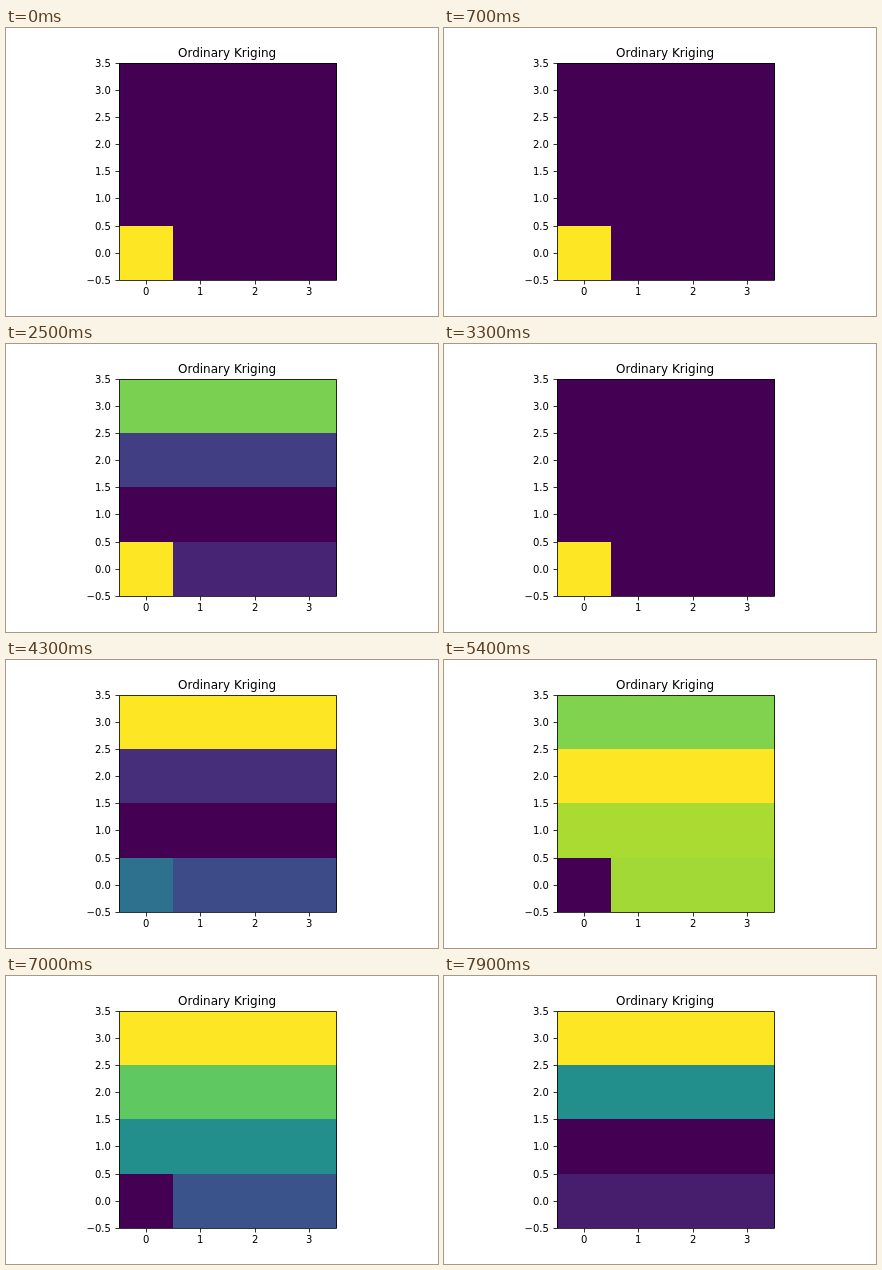
Write an HTML page that moves like this. It is 432x288 px and loops after 8000 ms.

```html
<!DOCTYPE html>
<html lang="en">
<head>
<meta charset="utf-8">
<title>Ordinary Kriging</title>
<style>
  html, body { margin: 0; width: 100%; height: 100%; overflow: hidden; background: #fff; }
  svg { display: block; width: 432px; height: 288px; }
  text { font: 10px "DejaVu Sans", sans-serif; fill: #000; }
  .title { font-size: 12px; }
  .end { text-anchor: end; }
  #cells { shape-rendering: crispEdges; }
  #axes path { fill: none; stroke: #000; stroke-width: .8; }
</style>
</head>
<body>
<svg viewBox="0 0 432 288" xmlns="http://www.w3.org/2000/svg">
  <g id="cells"></g>
  <g id="axes"></g>
</svg>
<script>
const LOOP = 8000, STEP = 100;
const LEFT = 112.68, BOTTOM = 252, CELL = 54.36;

// Viridis, evenly spaced from low to high
const VIRIDIS = '440154 482475 414487 355f8d 2a788e 21918c 22a884 44bf70 7ad151 bddf26 fde725'
  .split(' ').map(hex => [0, 2, 4].map(i => parseInt(hex.slice(i, i + 2), 16)));

// Levels: corner cell, then rows from bottom to top
const HIGH = [1, 0, 0, 0, 0], LOW = [0, 1, 1, 1, 1];
const pose = (from, to, levels) => ({ from, to, levels });
const POSES = [
  pose(0, 0, HIGH),
  pose(700, 800, HIGH),
  pose(1000, 1200, HIGH),
  pose(1400, 1400, [1, .69, .63, 0, .08]),
  pose(2500, 2500, [1, .1, 0, .18, .8]),
  pose(3300, 3900, HIGH),
  pose(4300, 4300, [.37, .23, 0, .13, 1]),
  pose(5400, 5400, [0, .86, .87, 1, .81]),
  pose(5800, 5900, LOW),
  pose(6200, 6300, LOW),
  pose(7300, 7400, [.08, .08, 0, .6, 1]),
  pose(7900, LOOP, [.08, .08, 0, .49, 1])
];

const mix = (a, b, k) => a + (b - a) * k;

function colour(level) {
  const p = level * 10, i = Math.min(9, Math.floor(p));
  return `rgb(${VIRIDIS[i].map((c, n) => Math.round(mix(c, VIRIDIS[i + 1][n], p - i)))})`;
}

function levelsAt(time) {
  const t = Math.floor(time / STEP) * STEP;
  const next = POSES.findIndex(p => t <= p.to);
  const b = POSES[next];
  if (t >= b.from) return b.levels;
  const a = POSES[next - 1];
  const k = (t - a.to) / (b.from - a.to);
  // rows drift apart midway; the colour scale always spans the full range
  const drift = .2 * Math.sin(Math.PI * k);
  const levels = a.levels.map((v, i) => mix(v, b.levels[i], k) + (i && drift * Math.sin(i * 2 + next)));
  const min = Math.min(...levels), max = Math.max(...levels);
  return levels.map(v => (v - min) / (max - min));
}

function add(parent, tag, attrs, text = '') {
  const el = document.createElementNS('http://www.w3.org/2000/svg', tag);
  for (const name in attrs) el.setAttribute(name, attrs[name]);
  el.textContent = text;
  return parent.appendChild(el);
}

const cells = document.getElementById('cells');
const axes = document.getElementById('axes');
const line = d => add(axes, 'path', { d });
const edge = row => Math.round(BOTTOM - row * CELL);
const band = (row, width) => add(cells, 'rect',
  { x: 113, y: edge(row + 1), width, height: edge(row) - edge(row + 1) });

const rows = [0, 1, 2, 3].map(row => band(row, 218));
const corner = band(0, 54);

for (let i = 0; i < 4; i++) {
  const x = LEFT + (i + .5) * CELL;
  line(`M${Math.round(x) + .5} 252.5v4`);
  add(axes, 'text', { x: Math.round(x - 2.8), y: 267 }, i);
}
for (let i = 0; i < 9; i++) {
  const y = edge(i / 2);
  line(`M113.5 ${y + .5}h-4`);
  add(axes, 'text', { x: 104.9, y: y + 4, class: 'end' },
    ((i - 1) / 2).toFixed(1).replace('-', '\u2212'));
}
line('M113.5 35.5H330.5V252.5H113.5Z');
add(axes, 'text', { x: 172, y: 29, class: 'title' }, 'Ordinary Kriging');

const start = performance.now();
function draw(now) {
  const [first, ...rest] = levelsAt(Math.max(0, now - start) % LOOP);
  corner.setAttribute('fill', colour(first));
  rows.forEach((row, i) => row.setAttribute('fill', colour(rest[i])));
  requestAnimationFrame(draw);
}
draw(start);
</script>
</body>
</html>
```
